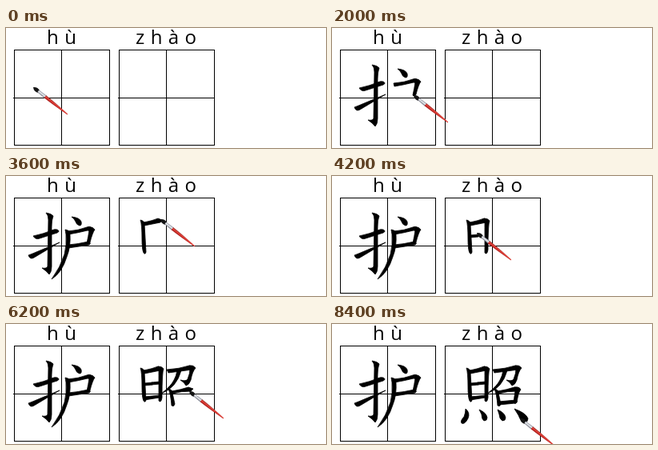
Write an HTML page that moves like this. It is 400x150 px and loops after 8.6 s.

```html
<!DOCTYPE html>
<html lang="zh">
<head>
<meta charset="utf-8">
<title>Stroke order</title>
<style>
html, body { margin: 0; width: 100%; height: 100%; overflow: hidden; background: #fff; }
svg { display: block; width: 400px; height: 150px; }
text { font: 24px "Open Sans", "Noto Sans", sans-serif; letter-spacing: .6px; }
.grid { fill: none; stroke: #000; shape-rendering: crispEdges; }
#ink { stroke: #000; stroke-width: .8; stroke-linejoin: round; }
#ink path { visibility: hidden; }
</style>
</head>
<body>
<svg viewBox="0 0 400 150">
  <defs>
    <path id="cell" d="M.5 .5H119.5V119.5H.5ZM59.5 0V120M-1 60.5H120"/>
    <linearGradient id="metal" x2="0" y2="1">
      <stop offset="0" stop-color="#889"/>
      <stop offset=".45" stop-color="#eef3f3"/>
      <stop offset="1" stop-color="#667"/>
    </linearGradient>
    <linearGradient id="lacquer" x2="0" y2="1">
      <stop offset="0" stop-color="#8a2420"/>
      <stop offset=".4" stop-color="#e8453c"/>
      <stop offset="1" stop-color="#980c0c"/>
    </linearGradient>
  </defs>
  <text x="51" y="20">h ù</text>
  <text x="162" y="20">z h à o</text>
  <g class="grid">
    <use href="#cell" x="10" y="27"/>
    <use href="#cell" x="141" y="27"/>
  </g>

  <!-- data-at: the step at which each piece of ink appears -->
  <g id="ink">
    <path data-at="1" d="M34 75Q37 80 42 78L64 71Q68 69 64 67Q61 66 57 68Q48 72 34 75Z"/>
    <path data-at="3" d="M50 46Q57 47 59 50Q57 55 57 64V113Q57 120 54 123Q51 119 45 115Q51 116 52 113L53 55Q53 49 50 46Z"/>
    <path data-at="5" d="M28 99Q30 105 35 102Q50 93 67 83Q50 90 38 95Q31 98 28 99Z"/>
    <path data-at="7" d="M82 51Q92 52 94 57Q95 62 92 62Q88 61 87 57Q85 53 82 51Z"/>
    <path data-at="9" d="M77 69Q91 68 101 64Q104 62 109 65L107 69L102 68Q90 71 78 73Z"/>
    <path data-at="10" d="M102 65Q109 64 111 67Q108 71 105 83Q103 87 101 84Q103 75 104 68Z"/>
    <path data-at="12" d="M78 86Q90 85 103 82Q107 84 104 86Q92 88 78 90Z"/>
    <path data-at="14" d="M74 67Q80 68 80 72Q81 89 76 101Q70 121 57 129Q68 114 73 98Q76 86 75 73Z"/>

    <path data-at="16" d="M168 55Q173 56 173 60L175 95Q174 99 172 96Q170 92 170 80Q170 60 168 55Z"/>
    <path data-at="18" d="M172 58Q183 56 190 53L195 55L193 58Q183 60 173 62Z"/>
    <path data-at="19" d="M190 53Q195 53 197 56Q195 60 195 92Q194 99 191 96Q191 70 191 57Z"/>
    <path data-at="21" d="M173 74L183 73V76L173 77Z"/>
    <path data-at="22" d="M182 73L192 72V75L182 76Z"/>
    <path data-at="23" d="M173 91L192 89V92L173 95Z"/>
    <path data-at="24" d="M201 57Q217 56 229 52L235 54L233 57Q218 59 203 61Z"/>
    <path data-at="25" d="M229 52Q234 51 237 55Q233 59 231 70Q229 76 225 77Q223 73 218 70Q225 72 227 69Q230 62 230 56Z"/>
    <path data-at="27" d="M214 57L219 58Q216 69 210 76Q204 83 194 87Q206 78 210 70Q213 65 214 57Z"/>
    <path data-at="29" d="M203 81Q208 82 208 86L211 100Q210 104 207 102Q206 88 203 81Z"/>
    <path data-at="31" d="M207 84Q219 82 228 79L234 81L231 84Q219 84 208 87Z"/>
    <path data-at="32" d="M228 79Q234 78 236 82Q233 85 231 98Q229 101 227 98L229 83Z"/>
    <path data-at="34" d="M208 97L230 95Q233 97 229 99L209 101Z"/>
    <path data-at="36" d="M167 106Q173 111 170 118Q166 126 162 124Q160 121 165 116Q167 111 167 106Z"/>
    <path data-at="38" d="M184 107Q193 111 194 117Q194 121 190 121Q187 119 187 113Z"/>
    <path data-at="40" d="M207 107Q216 111 217 117Q217 121 213 121Q209 118 209 113Z"/>
    <path data-at="42" d="M228 106Q242 111 245 118Q244 125 239 123Q235 120 233 114Z"/>
  </g>

  <g id="brush">
    <g transform="rotate(38.3)">
      <path d="M0 0Q4 -4 9 -1.7V1.7Q4 4 0 0Z" fill="#151515"/>
      <path d="M8 -1.7L20 -2V2L8 1.7Z" fill="url(#metal)"/>
      <path d="M19 -2Q30 -2.2 54 -.6Q56 0 54 .6Q30 2.2 19 2Z" fill="url(#lacquer)"/>
    </g>
  </g>
</svg>
<script>
const STEP = 200, STEPS = 43;
// Brush tip at every step, one line per stroke
const tips = [
  "34,74 64,68", "55,47 54,119", "28,98 62,80",
  "83,50 92,59", "77,70 107,65 102,84", "79,88 103,83", "77,68 54,124",
  "169,55 172,97", "172,58 193,54 192,97", "175,75 181,71 190,72",
  "190,91", "233,53 223,74", "216,58 195,86",
  "204,82 208,101", "208,84 229,84 229,97", "208,98 229,95",
  "168,107 163,120", "185,108 190,119", "208,108 213,119", "229,107 235,118"
].join(" ").split(" ");
const ink = document.querySelectorAll("#ink path");
const brush = document.getElementById("brush");
const start = performance.now();
let shown = -1;

function draw() {
  const step = Math.floor((performance.now() - start) / STEP) % STEPS;
  if (step !== shown) {
    shown = step;
    for (const piece of ink)
      piece.style.visibility = piece.dataset.at <= step ? "visible" : "hidden";
    brush.setAttribute("transform", `translate(${tips[step]})`);
  }
  requestAnimationFrame(draw);
}
draw();
</script>
</body>
</html>
```
